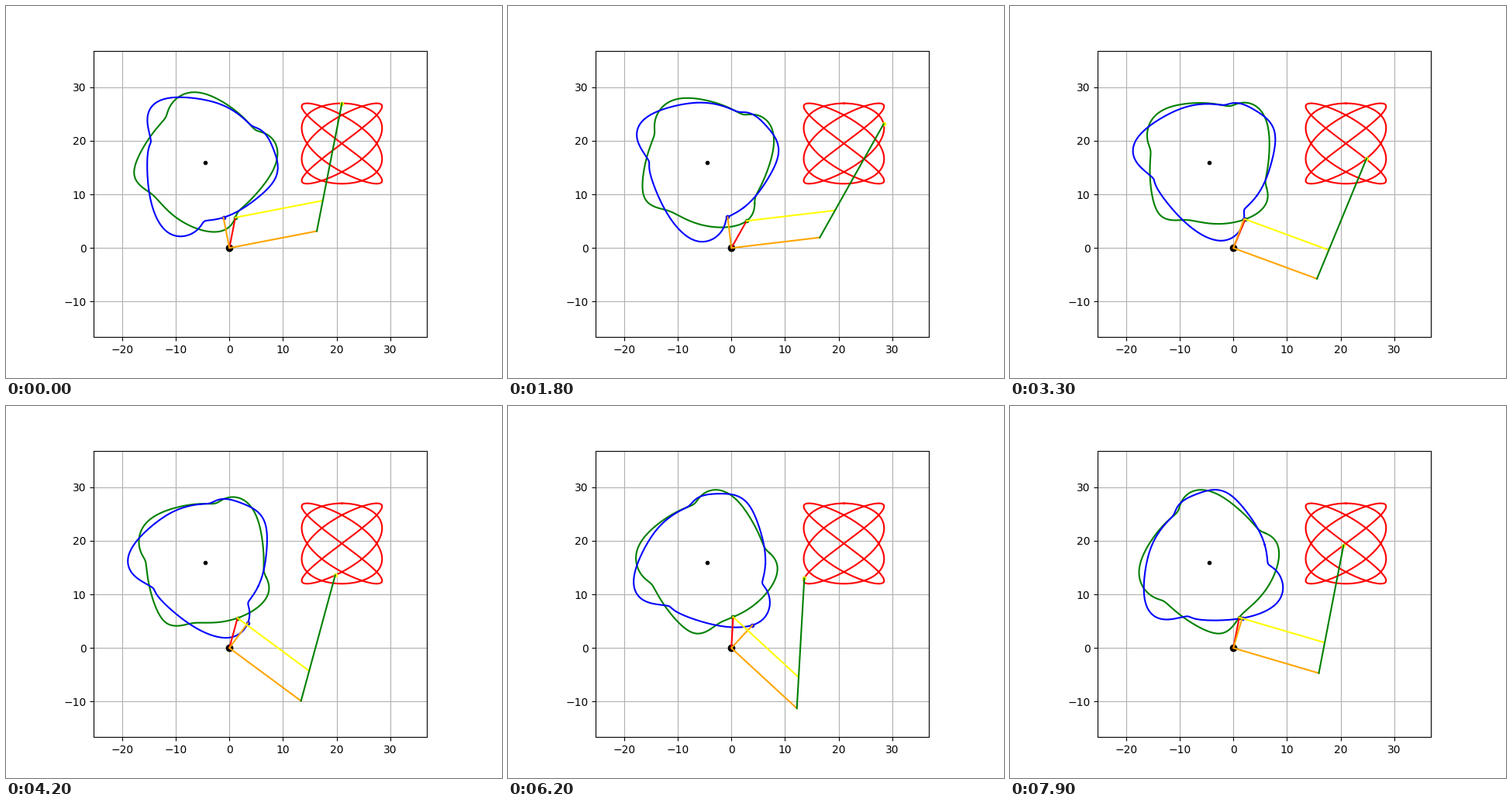
These frames come from a looping animation (640x480 px, 8000 ms). A matplotlib script:

```python
import numpy as np
import matplotlib.pyplot as plt
from matplotlib.animation import FuncAnimation

FRAMES, INTERVAL = 80, 100
STEPS = 320                      # samples in one full cam turn
CAM = -4.5 + 16j                 # cam shaft
SHORT, LONG, REACH = 5.8, abs(CAM), 24.3

theta = np.linspace(0, 2 * np.pi, STEPS)
pen = 21 + 7.5 * np.sin(4 * theta) + 1j * (19.5 + 7.5 * np.cos(3 * theta))

# Inverse kinematics of the two-link arm
dist = np.abs(pen)
shoulder = np.arccos((dist**2 + LONG**2 - REACH**2) / (2 * dist * LONG))
bend = np.arccos((dist**2 - LONG**2 - REACH**2) / (2 * LONG * REACH))
low = np.angle(pen) - shoulder
elbow = LONG * np.exp(1j * low)
blue_pin = SHORT * 1j * np.exp(1j * low)
green_pin = SHORT * np.exp(1j * (low + bend))


def cam_profile(pin):
    """Follower path seen from the turning cam."""
    return (pin - CAM) * np.exp(-1j * theta)


green_cam, blue_cam = cam_profile(green_pin), cam_profile(blue_pin)

fig, ax = plt.subplots(figsize=(6.4, 4.8), dpi=100)
ax.set_aspect("equal")
ax.set_xlim(-25.32, 36.83)
ax.set_ylim(-16.62, 36.83)
ax.grid(True)


def line(color, **style):
    return ax.plot([], [], color=color, **style)[0]


def place(artist, *points):
    z = np.concatenate([np.atleast_1d(p) for p in points])
    artist.set_data(z.real, z.imag)


def dot(color):
    return line(color, marker=".", linestyle="none")


place(line("black", marker="o", linestyle="none"), 0j)
place(dot("black"), CAM)
place(line("red"), pen)

green_curve, blue_curve = line("green"), line("blue")
green_dot, blue_dot, pen_dot = dot("green"), dot("blue"), dot("yellow")
crank, bell, link, arm = map(line, ("red", "orange", "yellow", "green"))


def update(i):
    turn = np.exp(1j * theta[i])
    g, b, e, p = green_pin[i], blue_pin[i], elbow[i], pen[i]
    place(green_curve, CAM + green_cam * turn)
    place(blue_curve, CAM + blue_cam * turn)
    place(green_dot, g)
    place(blue_dot, b)
    place(pen_dot, p)
    place(crank, 0j, g)
    place(bell, b, 0j, e)
    place(link, g, g + e)
    place(arm, e, p)
    return green_curve, blue_curve, green_dot, blue_dot, pen_dot, crank, bell, link, arm


anim = FuncAnimation(fig, update, frames=FRAMES, interval=INTERVAL,
                     repeat=True, repeat_delay=0, blit=False)
plt.show()
```
